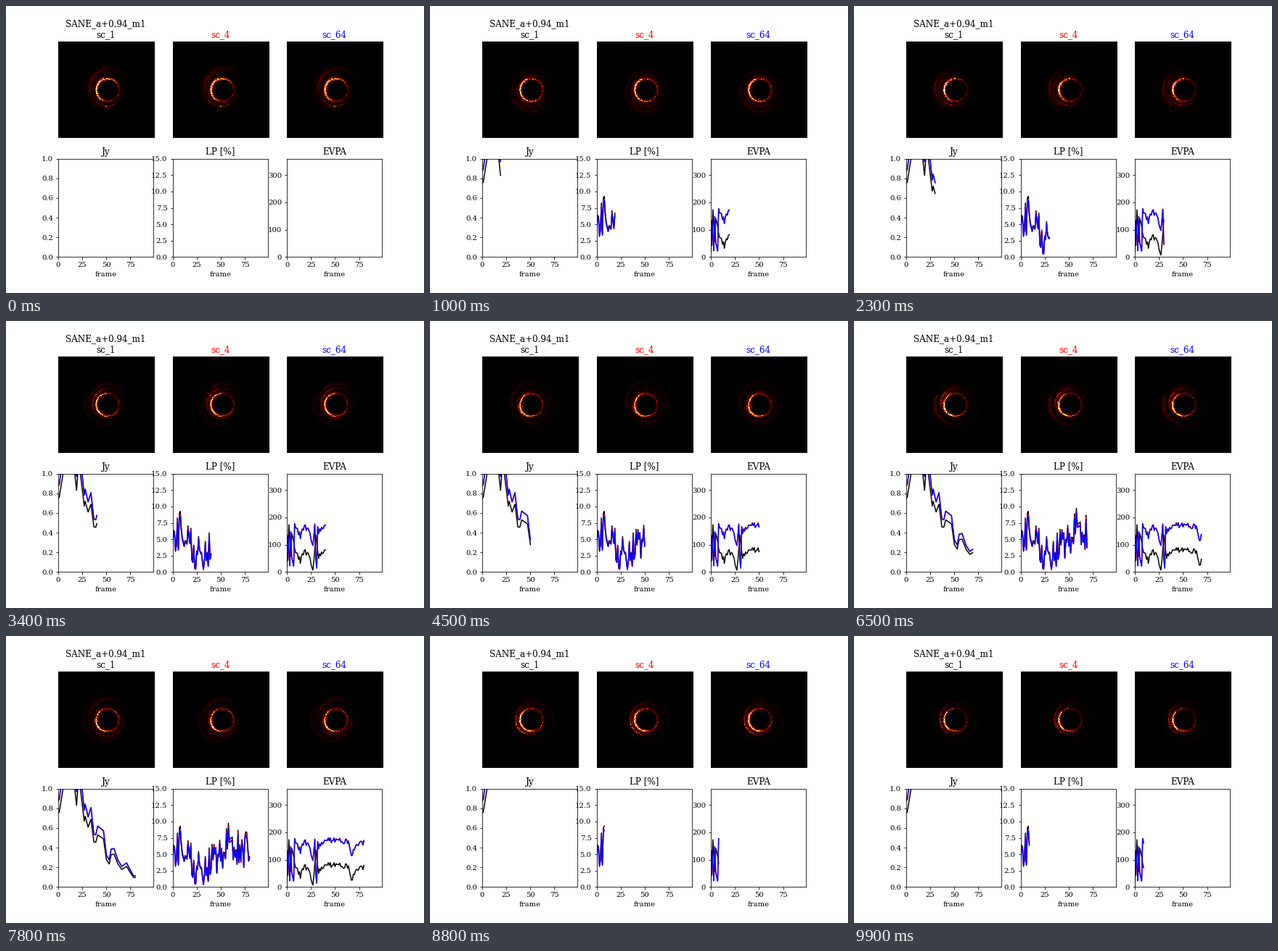
These frames come from a looping animation (576x396 px, 10000 ms). A matplotlib script:

```python
import numpy as np
import matplotlib.pyplot as plt
from matplotlib.animation import FuncAnimation

plt.rcParams.update({"font.family": "DejaVu Serif", "font.size": 10})

COUNT = 100
SIZE = 128
COLORS = ["black", "red", "blue"]
rng = np.random.default_rng(7)
steps = np.arange(COUNT)


def through(*points):
    """Straight segments through a few (step, value) points."""
    return np.interp(steps, *np.transpose(points))


def jitter(size):
    return rng.uniform(-size, size, COUNT)


# ---- light curves -------------------------------------------------------
flux = through((0, .75), (1, .76), (5, 1), (9, 1.2), (15, 1.2), (19, .83),
               (21, 1.1), (23, 1), (27, .67), (28, .72), (31, .61),
               (34, .69), (37, .46), (39, .455), (41, .53), (47, .49),
               (50, .28), (53, .235), (55, .33), (58, .335), (62, .235),
               (66, .18), (71, .21), (78, .1), (99, .07))

level = through((0, 3.5), (8, 7.5), (15, 4.2), (28, 2.8), (38, 4),
                (50, 5), (56, 7), (66, 6.3), (72, 5), (80, 6.5), (99, 5.5))
lp = np.clip(level + jitter(3), .3, 10.4)

evpa = through((0, 100), (1, 40), (2, 175), (4, 50), (5, 145), (9, 71),
               (14, 42), (18, 80), (23, 60), (27, 10), (30, 127), (33, 55),
               (42, 82), (64, 76), (67, 22), (73, 70), (99, 75))
evpa = np.abs(evpa + jitter(10))
turned = (evpa + 90) % 180

curves = [
    [flux, 1.165 * flux, 1.172 * flux],
    [lp, .95 * lp, .92 * lp + .08],
    [evpa, turned + 1, turned],
]

# ---- glowing ring -------------------------------------------------------
yy, xx = np.mgrid[:SIZE, :SIZE]
dx, dy = xx - 65, yy - 63.7
rad, phi = np.hypot(dx, dy), np.arctan2(dy, dx)
left = (1 - np.cos(phi + .1)) / 2
hole = 1 / (1 + np.exp((11 - rad) / .8))

ARCS = 34
arc_r = 14 + 19 * rng.random(ARCS) ** 2
arc_phi = rng.uniform(-np.pi, np.pi, ARCS)
arc_w = rng.uniform(.6, 1.5, ARCS)
arc_len = rng.uniform(.5, 1.5, ARCS)
arc_pitch = rng.uniform(0, 3, ARCS)
arc_life = rng.uniform(.08, .3, ARCS)


def disk(n):
    """Photon ring with spiral filaments orbiting around it."""
    ring = np.exp(-((rad - 15.2) / .8) ** 2) * (.2 + .7 * left ** 3)
    glow = .13 * np.exp(-((rad - 15.5) / 4) ** 2)
    for r0, p0, w, length, pitch, life in zip(
            arc_r, arc_phi, arc_w, arc_len, arc_pitch, arc_life):
        turn = .35 * n * (16 / r0) ** 1.5
        ang = (phi - p0 - turn + np.pi) % (2 * np.pi) - np.pi
        amp = .28 * (16 / r0) ** 1.8 * (.3 + .7 * np.sin(life * n + p0) ** 2)
        glow += amp * np.exp(-((rad - r0 - pitch * ang) / w) ** 2
                             - (ang / length) ** 2)
    return hole * (ring + glow * (.2 + .8 * left ** 1.5))


def soften(img, k):
    near = sum(np.roll(img, s, a) for s in (-1, 1) for a in (0, 1)) / 4
    return (1 - k) * img + k * near


def views(n):
    base = disk(n)
    grain = np.random.default_rng(500 + n).lognormal(0, .45, base.shape)
    sharp = base * grain
    peak = np.sort(sharp, axis=None)[-8]
    for k in (0, .15, .25):
        yield soften(sharp, k) / peak


# ---- figure -------------------------------------------------------------
W, H = 576, 396
fig, axes = plt.subplots(2, 3, figsize=(W / 72, H / 72), dpi=72)
fig.subplots_adjust(left=.125, right=.9, bottom=.125, top=.88,
                    wspace=.2, hspace=.2)

pics = []
names = ["SANE_a+0.94_m1\nsc_1", "sc_4", "sc_64"]
for ax, name, color in zip(axes[0], names, COLORS):
    box = ax.get_position()
    ax.set_position([box.x0, 214 / H, box.width + 1 / W, 133 / H])
    pics.append(ax.imshow(np.zeros((SIZE, SIZE)), cmap="afmhot", vmin=0,
                          vmax=1, interpolation="nearest", aspect="auto"))
    ax.set_title(name, color=color, x=.496)
    ax.axis("off")

lines = []
panels = [("Jy", 1, np.arange(0, 1.1, .2)),
          ("LP [%]", 15, np.arange(0, 15.1, 2.5)),
          ("EVPA", 360, np.arange(0, 301, 100))]
for ax, (name, top, ticks) in zip(axes[1], panels):
    ax.set(title=name, xlabel="frame", xlim=(0, COUNT - 1), ylim=(0, top),
           xticks=[0, 25, 50, 75], yticks=ticks)
    lines.append([ax.plot([], [], color=c, lw=1.5)[0] for c in COLORS])


def step_at(i):
    """Steps play in text order: 0, 10..19, 1, 20..29, 2, ..."""
    if i == 0:
        return 0
    tens, unit = divmod(i - 1, 11)
    tens += 1
    return 10 * tens + unit if unit < 10 else tens


def update(i):
    n = step_at(i)
    for pic, img in zip(pics, views(n)):
        pic.set_data(img)
    for group, data in zip(lines, curves):
        for line, values in zip(group, data):
            line.set_data(steps[:n + 1], values[:n + 1])
    return pics + sum(lines, [])


anim = FuncAnimation(fig, update, frames=COUNT, interval=100,
                     repeat=True, repeat_delay=0)
plt.show()
```
